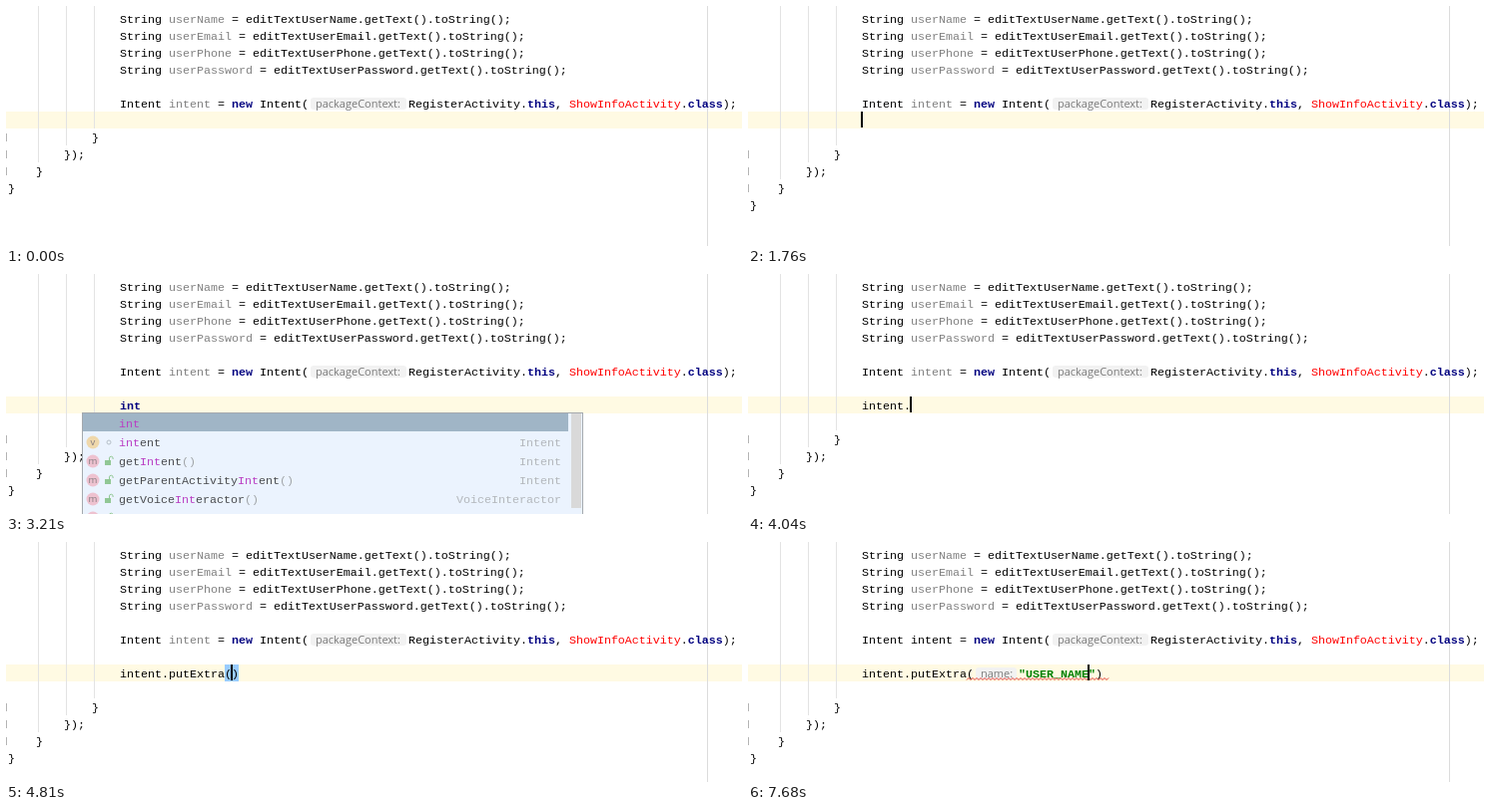
An HTML page that plays this animation: 737x241 px, repeating every 8 s.

```html
<!DOCTYPE html>
<html lang="en">
<head>
<meta charset="utf-8">
<title>Code typing</title>
<style>
html, body { margin: 0; width: 100%; height: 100%; overflow: hidden; background: #fff; }
svg { display: block; }
text { font: 11.667px "Liberation Mono", "Courier New", monospace; white-space: pre; fill: #000; }
.kw { font-weight: bold; fill: #000080; }
.str { font-weight: bold; fill: #008000; }
.dim { fill: #808080; }
.err { fill: #ff0000; }
.word { fill: #4a4c50; }
.hit { fill: #b93fc4; }
.type { fill: #b3b7bc; }
.args { fill: #a0a4a8; }
.hint { font: 11px "Open Sans", "Noto Sans", sans-serif; fill: #7a7a7a; }
.icon { font: 9.5px "Open Sans", "Noto Sans", sans-serif; fill: #4c3a3c; text-anchor: middle; }
</style>
</head>
<body>
<svg id="stage" width="737" height="241" viewBox="0 0 737 241"></svg>
<script>
const LOOP = 8000, CH = 7, LINE = 17, LEFT = 114, TOP = 4, EDIT = 123, ITEM = 19;
const stage = document.getElementById('stage');

const rect = (x, y, w, h, fill, extra = '') =>
  `<rect x="${x}" y="${y}" width="${w}" height="${h}" fill="${fill}" ${extra}/>`;
const span = (cls, s) => `<tspan class="${cls}">${s}</tspan>`;
const text = (x, y, s, attr = '') => `<text x="${x}" y="${y}" ${attr}>${s}</text>`;
const code = (x, top, s) => text(x, top + 13, s);
const hint = (x, top, w, s) =>
  rect(x, top + 3, w, 12, '#f2f2f2', 'rx="3"') + text(x + 5, top + 13, s, 'class="hint"');

// icon, name, first matching letter, arguments, type
const words = [
  ['', 'int', 0, '', ''],
  ['v', 'intent', 0, '', 'Intent'],
  ['m', 'getIntent', 3, '()', 'Intent'],
  ['m', 'getParentActivityIntent', 17, '()', 'Intent'],
  ['m', 'getVoiceInteractor', 8, '()', 'VoiceInteractor'],
  ['m', 'onPointerCaptureChanged', 2, '()', 'void']
];
const puts = ['int', 'String', 'boolean', 'long', 'float', 'double']
  .map(t => ['m', 'putExtra', 0, `(String name, ${t} value)`, 'Intent']);

const base = { row: 106, pad: 0, code: '', caret: null, list: null, pick: 0, match: 0,
               call: false, used: false, str: null, hint: false };
const typed = s => ({ code: s, caret: LEFT - 1 + s.length * CH });
const quoted = s => ({ str: s, hint: true, caret: 277 + s.length * CH });

// each step changes part of the state before it
const steps = [
  [0, {}],
  [760, { row: 89, caret: 731 }],
  [1760, { row: 106, pad: 1, caret: 113 }],
  [1990, { row: EDIT, pad: 2 }],
  [2530, typed('i')],
  [2610, typed('in')],
  [2680, typed('int')],
  [2750, { list: words, match: 3 }],
  [3210, { caret: null }],
  [3590, { pick: 1 }],
  [3750, { ...typed('intent'), list: null, pick: 0 }],
  [4040, typed('intent.')],
  [4120, { list: puts, match: 0 }],
  [4350, { ...typed('intent.p'), match: 1 }],
  [4810, { ...typed('intent.putExtra('), list: null, call: true }],
  [5120, { used: true }],
  [5350, { str: '', caret: 232 }],
  [5660, quoted('U')],
  [5800, quoted('US')],
  [5880, quoted('USD')],
  [5960, quoted('USDR')],
  [6500, quoted('USD')],
  [6640, quoted('US')],
  [6710, quoted('USE')],
  [6780, quoted('USER')],
  [7090, quoted('USER_')],
  [7400, quoted('USER_N')],
  [7470, quoted('USER_NA')],
  [7540, quoted('USER_NAM')],
  [7680, quoted('USER_NAME')]
];
let last = base;
const states = steps.map(([, change]) => last = { ...last, ...change });

function guides(pad) {
  const end = EDIT + pad * LINE;
  return [88, 60, 32].map((x, i) => rect(x, 0, 1, end + i * LINE, '#e3e3e3')).join('')
    + rect(702, 0, 1, 241, '#dcdcdc');
}

function listing(s) {
  const fields = ['Name', 'Email', 'Phone', 'Password'].map((f, i) => code(LEFT, TOP + i * LINE,
    `String ${span('dim', 'user' + f)} = editTextUser${f}.getText().toString();`));
  const name = s.used ? 'intent' : span('dim', 'intent');
  const end = EDIT + s.pad * LINE;
  const braces = ['}', '});', '}', '}'].map((b, i) => {
    const y = end + i * LINE;
    const fold = i < 3 ? rect(-6.5, y + 5.5, 7, 7, '#fff', 'stroke="#b4b4b4"') : '';
    return fold + code(86 - i * 28, y, b);
  });
  return fields.join('')
    + code(LEFT, 89, `Intent ${name} = ${span('kw', 'new')} Intent(`)
    + hint(305, 89, 96, 'packageContext:')
    + code(403, 89, `RegisterActivity.${span('kw', 'this')}, `
      + `${span('err', 'ShowInfoActivity')}.${span('kw', 'class')});`)
    + braces.join('');
}

function wave(x0, x1) {
  let d = '';
  for (let x = x0, i = 0; x <= x1; x += 2, i++) d += `${x},${i % 2 ? 136.5 : 138.5} `;
  return `<polyline points="${d}" fill="none" stroke="#e23a32" stroke-width="1"/>`;
}

function editLine(s) {
  let out = '', x = LEFT + s.code.length * CH;
  if (s.call && s.str === null) out += rect(219, EDIT, 14, LINE, '#99ccff');
  out += code(LEFT, EDIT, s.code === 'int' ? span('kw', s.code) : s.code);
  if (!s.call) return out;
  if (s.hint) {
    out += hint(x + 2, EDIT, 41, 'name:');
    x += 45;
  }
  if (s.str !== null) {
    out += code(x, EDIT, span('str', `"${s.str}"`));
    x += (s.str.length + 2) * CH;
  }
  out += code(x, EDIT, ')');
  return s.used ? out + wave(219, x + CH + 6) : out;
}

function badge(kind, x, y) {
  if (!kind) return '';
  const field = kind === 'v';
  const mark = field
    ? `<circle cx="${x + 27}" cy="${y}" r="2" fill="none" stroke="#9aa3ab"/>`
    : rect(x + 23, y - 1, 6, 5, '#62b05e')
      + `<path d="M${x + 27.5} ${y - 1}v-2a1.8 1.8 0 0 1 3.6 0v1" fill="none" stroke="#62b05e"/>`;
  return `<g opacity=".65"><circle cx="${x + 11}" cy="${y}" r="6.5" `
    + `fill="${field ? '#f2cb80' : '#f0a9b8'}"/>`
    + text(x + 11, y + 3, kind, 'class="icon"') + mark + '</g>';
}

function popup(s) {
  if (!s.list) return '';
  const x = s.list === words ? 76 : 125, top = 140;
  return rect(x + .5, top - .5, 501, 130, '#ebf3fe', 'stroke="#a4a9ae"')
    + rect(x + 1, top, 486, ITEM, '#ebf3fe')
    + rect(x + 1, top + s.pick * ITEM, 486, ITEM - 1, '#a0b5c6')
    + rect(x + 490, top, 10, 95, '#d9d9d9')
    + s.list.map(([kind, name, from, args, type], i) => {
      const y = top + i * ITEM, to = from + s.match;
      return badge(kind, x, y + 10)
        + text(x + 37, y + 14, span('word', name.slice(0, from)) + span('hit', name.slice(from, to))
          + span('word', name.slice(to)) + span('args', args))
        + text(x + 480, y + 14, type, 'class="type" text-anchor="end"');
    }).join('');
}

function draw(s) {
  stage.innerHTML = rect(0, s.row, 737, LINE, '#fffae3') + guides(s.pad) + listing(s)
    + editLine(s) + (s.caret === null ? '' : rect(s.caret, s.row, 2, 16, '#000')) + popup(s);
}

let shown = -1;
function tick() {
  const t = performance.now() % LOOP;
  const now = steps.findLastIndex(([start]) => start <= t);
  if (now !== shown) draw(states[shown = now]);
  requestAnimationFrame(tick);
}
tick();
</script>
</body>
</html>
```
